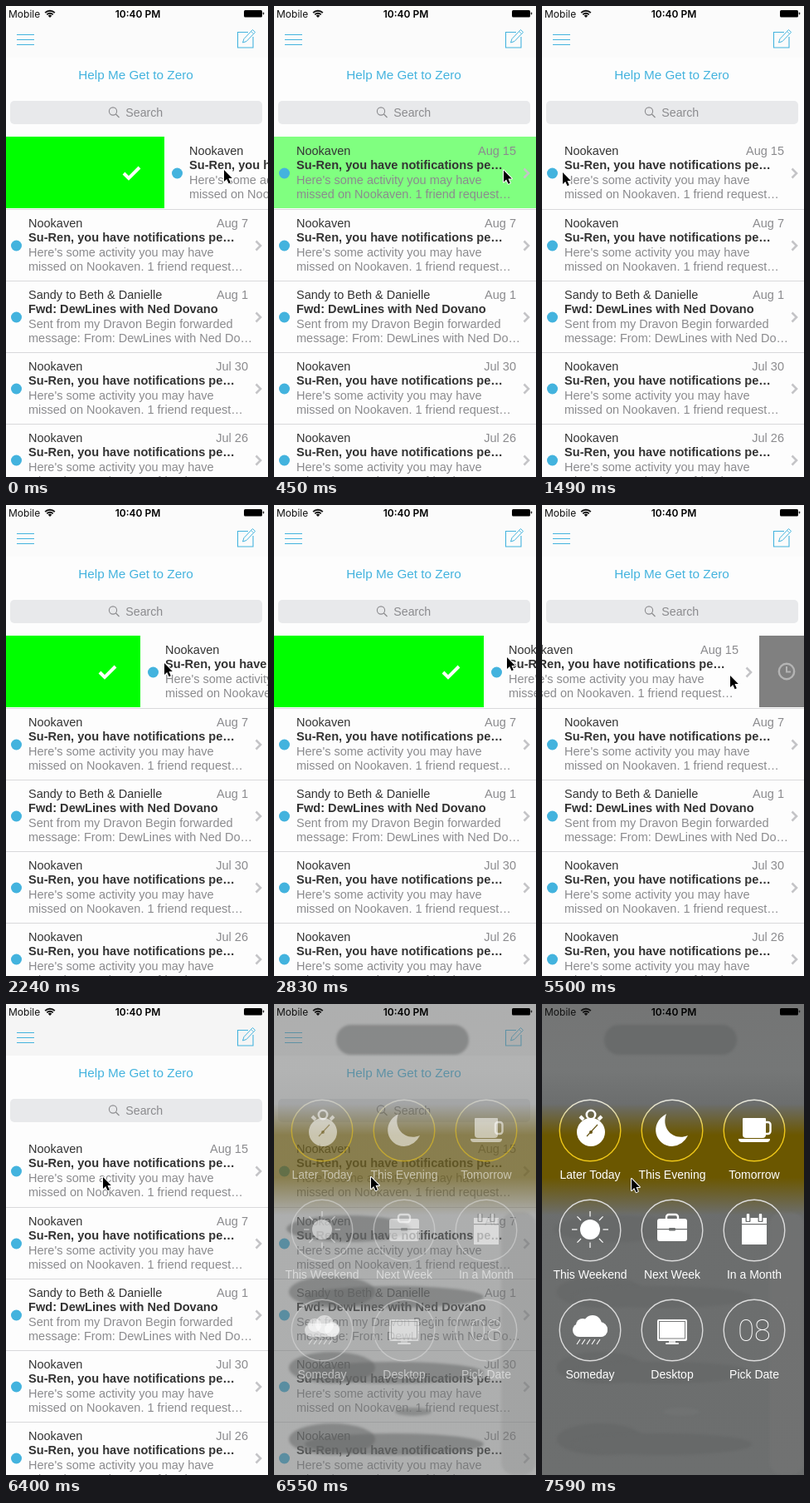
These frames come from a looping animation (316x566 px, 8000 ms). An HTML page with a canvas:

```html
<!DOCTYPE html>
<html lang="en">
<head>
<meta charset="utf-8">
<title>Swipe inbox</title>
<style>
  html, body { margin: 0; width: 100%; height: 100%; overflow: hidden; background: #fdfdfd; }
  canvas { display: block; width: 316px; height: 566px; }
</style>
</head>
<body>
<canvas id="stage"></canvas>
<script>
const W = 316, H = 566, LOOP = 8000, STEP = 148.6, LAST = 51;
const SANS = '"Liberation Sans", Arial, sans-serif';
const UI = 'Inter, "Liberation Sans", sans-serif';
const BLUE = '#43b3de', INK = '#333', GREY = '#8b8b8e';
const ROW_TOP = 157, ROW_H = 86;

const canvas = document.getElementById('stage');
const dpr = window.devicePixelRatio || 1;
canvas.width = W * dpr;
canvas.height = H * dpr;
const c = canvas.getContext('2d');

const notice = ['Nookaven', 'Su-Ren, you have notifications pe…',
  "Here's some activity you may have", 'missed on Nookaven. 1 friend request…'];
const mails = [
  ['Aug 15', ...notice],
  ['Aug 7', ...notice],
  ['Aug 1', 'Sandy to Beth & Danielle', 'Fwd: DewLines with Ned Dovano',
    'Sent from my Dravon Begin forwarded', 'message: From: DewLines with Ned Do…'],
  ['Jul 30', ...notice],
  ['Jul 26', ...notice]
];

// Keys are [step, value, ...]
const swipe = [[0, 194], [2, 208], [3, 0], [10, 0], [11, 6], [13, 80], [15, 165], [19, 256],
  [21, 266], [23, 266], [24, 0], [35, 0], [36, -12], [37, -55], [39, -125], [42, -165], [43, 0]];
const pointer = [[0, 263, 197], [2, 277, 197], [4, 277, 198], [9, 31, 200], [10, 25, 200],
  [11, 32, 200], [13, 106, 196], [15, 191, 190], [19, 281, 183], [21, 291, 183], [25, 291, 183],
  [30, 298, 200], [31, 298, 200], [34, 301, 205], [35, 301, 205], [36, 271, 205], [37, 227, 205],
  [39, 157, 207], [42, 117, 208], [47, 117, 208], [49, 113, 204], [51, 108, 210]];
const fade = [[43, 0], [44, 0.55], [45, 1]];
const tints = { 3: '#80ff80', 4: '#f3fff3', 24: '#ff8080', 25: '#fff3f4' };

function at(keys, n) {
  if (n <= keys[0][0]) return keys[0].slice(1);
  for (let i = 1; i < keys.length; i++) {
    const a = keys[i - 1], b = keys[i];
    if (n <= b[0]) {
      const k = (n - a[0]) / (b[0] - a[0]);
      return a.slice(1).map((v, j) => v + (b[j + 1] - v) * k);
    }
  }
  return keys[keys.length - 1].slice(1);
}

function box(x, y, w, h, fill, r = 0) {
  c.fillStyle = fill;
  c.beginPath();
  c.roundRect(x, y, w, h, r);
  c.fill();
}

function disc(x, y, r, fill) {
  c.fillStyle = fill;
  c.beginPath();
  c.arc(x, y, r, 0, Math.PI * 2);
  c.fill();
}

function ring(x, y, r, color, width) {
  c.strokeStyle = color;
  c.lineWidth = width;
  c.beginPath();
  c.arc(x, y, r, 0, Math.PI * 2);
  c.stroke();
}

function line(points, color, width) {
  c.strokeStyle = color;
  c.lineWidth = width;
  c.beginPath();
  points.forEach(([x, y]) => c.lineTo(x, y));
  c.stroke();
}

function text(str, x, y, font, color, align = 'left') {
  c.font = font;
  c.fillStyle = color;
  c.textAlign = align;
  c.fillText(str, x, y);
}

function statusBar() {
  text('Mobile', 3, 13.5, '12px ' + UI, '#111');
  text('10:40 PM', 159, 13.5, '600 12px ' + UI, '#000', 'center');
  c.strokeStyle = '#111';
  c.lineWidth = 1.9;
  for (const r of [8.2, 5.2]) {
    c.beginPath();
    c.arc(53, 14, r, -Math.PI * 0.75, -Math.PI * 0.25);
    c.stroke();
  }
  c.fillStyle = '#111';
  c.beginPath();
  c.moveTo(53, 14);
  c.arc(53, 14, 3.2, -Math.PI * 0.75, -Math.PI * 0.25);
  c.fill();
  box(287, 5, 22, 8.5, '#000', 1.5);
  box(309.8, 7.5, 1.4, 3, '#222', 0.7);
}

function header(shade) {
  box(0, 0, W, 62, shade);
  for (const y of [34.5, 40.5, 46.5]) line([[13, y], [34, y]], BLUE, 1);
  line([[292, 31.5], [279.5, 31.5], [279.5, 50], [298, 50], [298, 37]], BLUE, 1.1);
  line([[285.5, 44], [287, 39.5], [297.5, 28.5], [300.5, 31.5], [290, 42.5], [285.5, 44]], BLUE, 1);
  line([[295.5, 30.5], [298.5, 33.5]], BLUE, 0.8);
  text('Help Me Get to Zero', 156.5, 88, '15.3px ' + SANS, BLUE, 'center');
  box(5, 114, 304, 28, '#e8e9eb', 5);
  ring(129, 126.5, 4.6, GREY, 1.1);
  line([[132.5, 130], [136.5, 134]], GREY, 1.3);
  text('Search', 144.3, 133, '14.2px ' + SANS, GREY);
}

function mail([date, from, title, ...body], x, y, fill) {
  box(x - 3, y, 320, ROW_H, fill);
  disc(x + 12.5, y + 44, 6.5, BLUE);
  text(from, x + 27, y + 22, '14.5px ' + SANS, INK);
  text(date, x + 292, y + 22, '14.5px ' + SANS, GREY, 'right');
  text(title, x + 27, y + 39, 'bold 14.6px ' + SANS, INK);
  body.forEach((s, i) => text(s, x + 27, y + 57 + 17 * i, '14.5px ' + SANS, GREY));
  line([[x + 301.5, y + 38.5], [x + 307, y + 44], [x + 301.5, y + 49.5]], '#c4c4c7', 2.6);
}

function swipePanel(off) {
  const far = Math.abs(off), y = ROW_TOP + 43;
  const hot = off > 0 ? ['#0f0', '#f00'] : ['#ff0', '#a52a2a'];
  box(0, ROW_TOP, W, ROW_H, far < 60 ? '#808080' : hot[far < 260 ? 0 : 1]);
  c.globalAlpha = Math.min(1, far / 60);
  if (off > 0) {
    const x = Math.max(17, off - 43);
    if (off < 260) {
      line([[x - 9, y + 1], [x - 3, y + 7], [x + 10, y - 6]], '#fff', 4);
    } else {
      line([[x - 7, y - 7], [x + 7, y + 7]], '#fff', 3.5);
      line([[x + 7, y - 7], [x - 7, y + 7]], '#fff', 3.5);
    }
  } else {
    const x = Math.min(295, W + off + 39);
    c.globalAlpha *= far < 60 ? 0.45 : 1;
    ring(x, y, 9.2, '#fff', 2.4);
    line([[x, y - 6], [x, y + 0.5], [x + 5, y + 0.5]], '#fff', 2);
  }
  c.globalAlpha = 1;
}

function inbox(n) {
  const [off] = at(swipe, n);
  box(0, 0, W, H, '#fdfdfd');
  header(n >= 43 ? '#f5f5f5' : '#fbfbfb');
  if (off) swipePanel(off);
  mails.forEach((m, i) => {
    const y = i ? 244 + ROW_H * (i - 1) : ROW_TOP;
    mail(m, i ? 0 : off, y, i ? '#fdfdfd' : tints[n] || '#fdfdfd');
  });
  for (let i = 0; i < 4; i++) box(0, 244 + ROW_H * i, W, 1, '#d9d9db');
}

const icons = {
  'Later Today'(x, y) {
    disc(x + 1, y + 2, 17, '#fff');
    ring(x + 1, y - 19, 5.2, '#fff', 2.6);
    line([[x - 12, y - 17], [x - 8, y - 13]], '#fff', 4);
    line([[x + 14, y - 17], [x + 10, y - 13]], '#fff', 4);
    line([[x - 4, y + 7], [x + 9, y - 7]], '#695718', 1.2);
    disc(x + 1, y + 2, 2, '#695718');
  },
  'This Evening'(x, y) {
    c.fillStyle = '#fff';
    c.beginPath();
    c.moveTo(x - 7, y - 20);
    c.bezierCurveTo(x - 29, y - 8, x - 20, y + 19, x, y + 19);
    c.quadraticCurveTo(x + 13, y + 18, x + 19, y + 6);
    c.bezierCurveTo(x + 2, y + 13, x - 14, y - 2, x - 7, y - 20);
    c.fill();
  },
  Tomorrow(x, y) {
    box(x - 14, y - 15, 28, 24, '#fff', [1, 1, 4, 4]);
    c.strokeStyle = '#fff';
    c.lineWidth = 2.4;
    c.beginPath();
    c.roundRect(x + 11, y - 10, 8.5, 14, 3);
    c.stroke();
    box(x - 19, y + 10, 38, 4, '#fff', [0, 0, 4, 4]);
  },
  'This Weekend'(x, y) {
    disc(x, y - 1, 12, '#fff');
    for (let i = 0; i < 8; i++) {
      const u = Math.cos(i * Math.PI / 4), v = Math.sin(i * Math.PI / 4);
      line([[x + 15.5 * u, y - 1 + 15.5 * v], [x + 22 * u, y - 1 + 22 * v]], '#fff', 1.2);
    }
  },
  'Next Week'(x, y) {
    c.strokeStyle = '#fff';
    c.lineWidth = 2.4;
    c.beginPath();
    c.roundRect(x - 7, y - 19, 14, 9, 3);
    c.stroke();
    box(x - 18, y - 14, 36, 27, '#fff', 3);
    box(x - 18, y - 2, 36, 1.2, '#6d6f6f');
    box(x - 4, y - 3, 8, 3.5, '#6d6f6f', 1);
  },
  'In a Month'(x, y) {
    box(x - 15, y - 15, 30, 32, '#fff');
    box(x - 15, y - 8, 30, 1.2, '#6d6f6f');
    for (const d of [-7.5, 7.5]) {
      box(x + d - 3, y - 20, 6, 10, '#6d6f6f', 1);
      box(x + d - 1.7, y - 20, 3.4, 9, '#fff', 1);
    }
  },
  Someday(x, y) {
    box(x - 21, y - 8, 42, 16, '#fff', 8);
    disc(x - 9, y - 6, 8, '#fff');
    disc(x + 3, y - 7, 11, '#fff');
    disc(x + 12, y - 1, 9, '#fff');
    for (let i = -2; i < 3; i++) {
      line([[x + i * 6 - 4, y + 17], [x + i * 6, y + 11]], '#fff', 1.1);
    }
  },
  Desktop(x, y) {
    box(x - 18, y - 13, 36, 26, '#fff', 2);
    c.strokeStyle = '#6d6f6f';
    c.lineWidth = 0.9;
    c.strokeRect(x - 15.5, y - 10.5, 31, 20.5);
    box(x - 4, y + 13, 8, 2, '#ddd');
    box(x - 8, y + 15, 16, 2, '#fff', 1);
  },
  'Pick Date'(x, y) {
    text('08', x, y + 13, '100 36px Roboto, Lato, sans-serif', '#fff', 'center');
  }
};

function blob(x, y, rx, ry) {
  c.beginPath();
  c.ellipse(x, y, rx, ry, 0, 0, Math.PI * 2);
  c.fill();
}

function backdrop() {
  const base = c.createLinearGradient(0, 0, 0, H);
  base.addColorStop(0, '#747575');
  base.addColorStop(0.14, '#757777');
  base.addColorStop(0.22, '#6b6d6d');
  base.addColorStop(1, '#6d6f6f');
  box(0, 0, W, H, base);
  c.filter = 'blur(1.5px)';
  box(75, 25, 160, 36, '#696b6b', 18);
  c.fillStyle = '#676969';
  blob(90, 270, 75, 16);
  for (const y of [349, 440, 526]) {
    blob(70, y - 3, 52, 19);
    blob(145, y + 3, 108, 13);
  }
  c.fillStyle = '#707272';
  blob(168, 490, 22, 5);
  box(274, 250, 42, 316, 'rgba(120,122,122,.35)', 16);
  c.filter = 'none';
  const band = c.createLinearGradient(0, 120, 0, 254);
  band.addColorStop(0, 'rgba(107,87,0,0)');
  band.addColorStop(0.28, '#6b5700');
  band.addColorStop(0.66, '#6b5700');
  band.addColorStop(1, 'rgba(107,87,0,0)');
  box(0, 120, W, 134, band);
}

function menu(alpha) {
  c.globalAlpha = alpha;
  backdrop();
  const gold = c.createLinearGradient(0, 115, 0, 189);
  gold.addColorStop(0, '#e6e6e0');
  gold.addColorStop(0.25, '#e6dda0');
  gold.addColorStop(0.5, '#f0c818');
  gold.addColorStop(1, '#f0c818');
  Object.entries(icons).forEach(([name, draw], i) => {
    const x = 58 + 99 * (i % 3), y = 152 + 120 * Math.floor(i / 3);
    ring(x, y, 36.8, i < 3 ? gold : '#dcdcdc', 1.4);
    draw(x, y);
    text(name, x, y + 58, '14px ' + SANS, '#fff', 'center');
  });
  c.globalAlpha = 1;
}

function arrow(x, y) {
  c.beginPath();
  [[0, 0], [0, 14], [3.2, 11], [5.6, 16.2], [7.8, 15.2], [5.5, 10], [9.8, 10]]
    .forEach(([u, v]) => c.lineTo(x + u, y + v));
  c.closePath();
  c.lineJoin = 'round';
  c.strokeStyle = '#fff';
  c.lineWidth = 2;
  c.stroke();
  c.fillStyle = '#000';
  c.fill();
  c.lineJoin = 'miter';
}

function render(now) {
  const n = Math.min(LAST, Math.floor((now % LOOP) / STEP));
  const [alpha] = at(fade, n);
  c.setTransform(dpr, 0, 0, dpr, 0, 0);
  inbox(n);
  if (alpha) menu(alpha);
  statusBar();
  arrow(...at(pointer, n));
}

const start = performance.now();
function tick() {
  render(performance.now() - start);
  requestAnimationFrame(tick);
}
tick();
</script>
</body>
</html>
```
